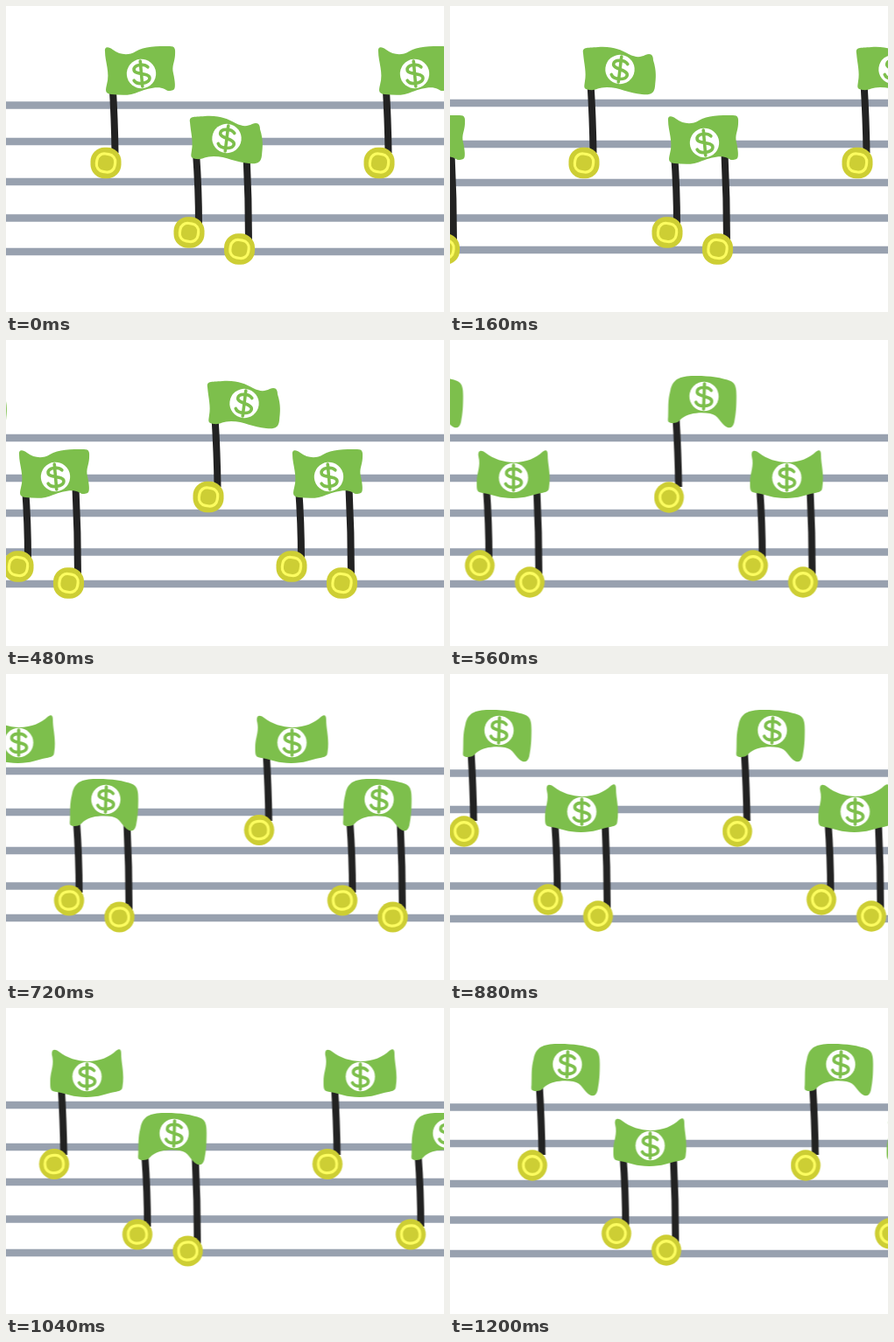
Recreate the animation shown at these times as an HTML page. Size 500 by 350 pixels, loop 1280 ms.

```html
<!DOCTYPE html>
<html lang="en">
<head>
<meta charset="utf-8">
<title>Money notes</title>
<style>
  html, body { margin: 0; width: 100%; height: 100%; overflow: hidden; background: #fff; }
  svg { display: block; width: 500px; height: 350px; }

  .staff { fill: #98a1af; animation: staff 1280ms step-end infinite; }
  .staff rect { transform: translateY(var(--y)); }
  .staff :nth-child(1) { --y: var(--a); }
  .staff :nth-child(2) { --y: var(--b); }
  .staff :nth-child(3) { --y: var(--c); }
  .staff :nth-child(4) { --y: var(--d); }
  .staff :nth-child(5) { --y: var(--e); }
  @keyframes staff {
    0%, 87.5%, 100% { --a: 113.5px; --b: 155px; --c: 201px; --d: 242.5px; --e: 281px; }
    12.5%, 50% { --a: 111px; --b: 158px; --c: 202px; --d: 242.5px; --e: 279px; }
    37.5% { --a: 112px; --b: 158px; --c: 198px; --d: 242.5px; --e: 279px; }
    62.5% { --a: 113.5px; --b: 155px; --c: 202px; --d: 242.5px; --e: 280px; }
    75% { --a: 111px; --b: 159px; --c: 199px; --d: 241.5px; --e: 280px; }
  }

  .strip { animation: scroll 1280ms steps(16) infinite; }
  @keyframes scroll { to { transform: translateX(312px); } }

  .pose { visibility: hidden; animation: show 320ms step-end infinite; }
  .pose:nth-child(2) { animation-delay: -240ms; }
  .pose:nth-child(3) { animation-delay: -160ms; }
  .pose:nth-child(4) { animation-delay: -80ms; }
  @keyframes show {
    0% { visibility: visible; }
    25%, 100% { visibility: hidden; }
  }

  .bill { fill: #7dbf4c; }
  .stem { fill: none; stroke: #222; stroke-width: 8; }
  .sign { fill: none; stroke: #7dbf4c; stroke-width: 3.6; stroke-linecap: round; }
  .gold { fill: #cdce34; }
  .ring { fill: none; stroke: #fcfc60; stroke-width: 3.2; }
</style>
</head>
<body>
<svg viewBox="0 0 500 350">
  <defs>
    <g id="dollar">
      <circle r="16.7" fill="#fff"/>
      <path class="sign" d="M8-7C4-12-8-11-8-5C-8 1 9-1 9 5.500C9 12-6 13-9 7M0-14.500V14.500"/>
    </g>

    <g id="stems">
      <path class="stem" d="M121.500 88Q124 130 124.500 168M217 168Q220 210 220 250M274.500 169Q277 220 277 270"/>
    </g>

    <!-- the four phases of the waving bill -->
    <g id="bill0">
      <path class="bill" d="M113 52C112 46 117 46 122 50C130 56 140 57 148 52C158 46 172 46 187 46C193 46 193.500 49 193 56C192.500 65 189 68 191 77C193 86 194 95 191 96C186 98 184 97 181 95C173 91 161 95 152 98C142 103 132 102 120 101C112 100 114 95 115 90C119 76 113 64 113 52Z"/>
      <use href="#dollar" transform="translate(154.500 77.500) rotate(-5)"/>
    </g>
    <g id="bill1">
      <path class="bill" d="M109 84C109 72 114 66 111 54C110 47 114 46 119 50C128 57 140 61 152 61C165 61 177 56 184 49C188 46 190 47 190 52C190 64 194 74 191.500 90C191 95 187 95 183 96C172 98 165 102 150 102C135 102 128 98 116 96C109 95 109 93 109 84Z"/>
      <use href="#dollar" transform="translate(151 78.500)"/>
    </g>
    <g id="bill2">
      <path class="bill" d="M113 54C112 47 116 48 130 47C148 46 155 50 165 55C173 59 178 59 184 56C191 53 193 57 193 62C197 75 196 82 195 92C194 101 189 102 180 101C165 100 155 93 140 93C130 93 127 97 120 96C113 95 114 93 115 86C117 76 114 66 113 54Z"/>
      <use href="#dollar" transform="translate(155 72.500) rotate(7)"/>
    </g>
    <g id="bill3">
      <path class="bill" d="M112.500 88C113 76 112 70 115 58C118 43 128 41 145 41C160 41 174 43 184 47C190 50 190.500 56 190.500 64C190.500 76 190 84 188 94C186.500 101 182 102 177 98C171 93 170 86 160 84C148 82 136 84 129 89C125 92 124 95 118 95C112 95 112 93 112.500 88Z"/>
      <use href="#dollar" transform="translate(153.500 64.500) rotate(2)"/>
    </g>

    <g id="coinA">
      <rect class="gold" x="-17.500" y="-17.800" width="35" height="35.600" rx="16"/>
      <rect class="ring" x="-10.500" y="-10.300" width="21" height="20.600" rx="8.500" transform="rotate(8)"/>
    </g>
    <g id="coinB">
      <ellipse class="gold" rx="17.200" ry="17.500"/>
      <rect class="ring" x="-10.500" y="-10" width="21" height="20" rx="9" transform="rotate(-5)"/>
    </g>
    <g id="coinC">
      <ellipse class="gold" rx="17" ry="17.700"/>
      <circle class="ring" r="10.300"/>
    </g>

    <g id="tile0">
      <use href="#stems"/>
      <use href="#bill0"/><use href="#bill2" x="97" y="79"/>
      <use href="#coinA" x="114" y="179.500"/><use href="#coinA" x="209" y="259"/><use href="#coinA" x="266.500" y="278"/>
    </g>
    <g id="tile1">
      <use href="#stems"/>
      <use href="#bill1"/><use href="#bill3" x="97" y="79"/>
      <use href="#coinB" x="113.500" y="178.500"/><use href="#coinB" x="208.500" y="259"/><use href="#coinB" x="266" y="278"/>
    </g>
    <g id="tile2">
      <use href="#stems"/>
      <use href="#bill2"/><use href="#bill0" x="97" y="79"/>
      <use href="#coinA" x="114" y="179.500"/><use href="#coinA" x="209" y="259"/><use href="#coinA" x="266.500" y="278"/>
    </g>
    <g id="tile3">
      <use href="#stems"/>
      <use href="#bill3"/><use href="#bill1" x="97" y="79"/>
      <use href="#coinC" x="113.500" y="180"/><use href="#coinC" x="209.500" y="258"/><use href="#coinC" x="266.500" y="277"/>
    </g>
  </defs>

  <g class="staff">
    <rect y="-4.250" width="500" height="8.500"/>
    <rect y="-4.250" width="500" height="8.500"/>
    <rect y="-4.250" width="500" height="8.500"/>
    <rect y="-4.250" width="500" height="8.500"/>
    <rect y="-4.250" width="500" height="8.500"/>
  </g>

  <g class="strip">
    <g class="pose"><use href="#tile0" x="-312"/><use href="#tile0"/><use href="#tile0" x="312"/></g>
    <g class="pose"><use href="#tile1" x="-312"/><use href="#tile1"/><use href="#tile1" x="312"/></g>
    <g class="pose"><use href="#tile2" x="-312"/><use href="#tile2"/><use href="#tile2" x="312"/></g>
    <g class="pose"><use href="#tile3" x="-312"/><use href="#tile3"/><use href="#tile3" x="312"/></g>
  </g>
</svg>
</body>
</html>
```
